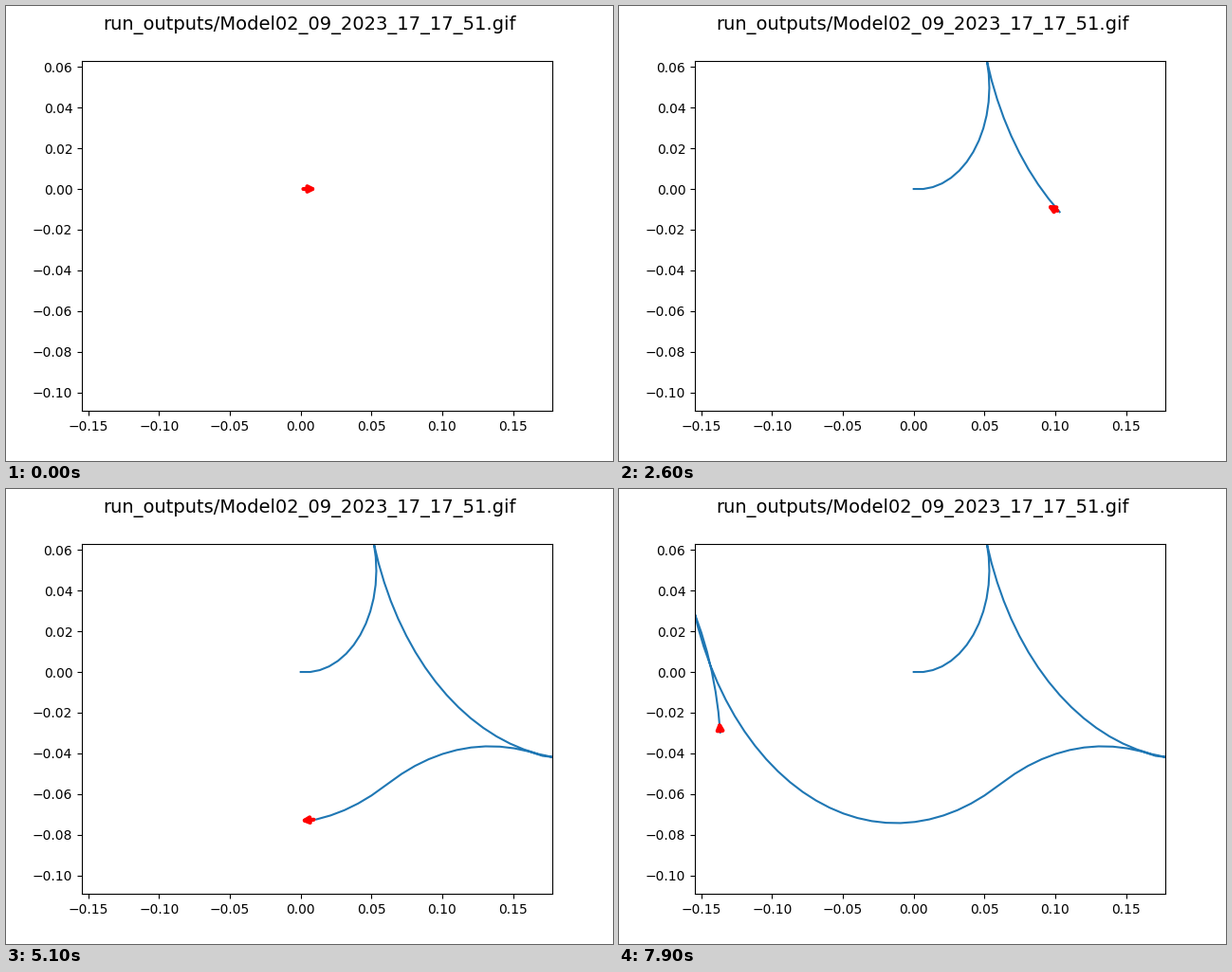
Animation of 640 by 480 pixels, one loop 8000 ms. Source, as a matplotlib script:

```python
import numpy as np
import matplotlib.pyplot as plt
from matplotlib.animation import FuncAnimation

WHEEL = 0.0136  # distance a wheel rolls per frame at full speed
BASE = 0.1      # distance between the two wheels
ARROW = 0.04    # arrow length as a share of each axis range

# Wheel settings: (left, right) as shares of full speed
PARK = (0, 0)
STRAIGHT = (1, 1)
PIVOT_LEFT, PIVOT_RIGHT = (0, 1), (1, 0)
BEND_LEFT, BEND_RIGHT = (0.5, 1), (1, 0.5)

poses = [(0.0, 0.0, 0.0)]


def roll(wheels, steps=1, gear=1):
    """Drive the two-wheeled cart and record its pose after each step."""
    left, right = (gear * WHEEL * w for w in wheels)
    dist, turn = (left + right) / 2, (right - left) / BASE
    for _ in range(steps):
        x, y, a = poses[-1]
        poses.append((x + dist * np.cos(a), y + dist * np.sin(a), a + turn))


roll(PARK)
roll(PIVOT_LEFT, 14)
roll(PARK, 2)
roll(BEND_RIGHT, 17, gear=-1)
roll(PIVOT_RIGHT)
roll(BEND_LEFT, 10)
roll(STRAIGHT)
roll(BEND_RIGHT, 25)
roll(PARK)
roll(PIVOT_LEFT)
roll(BEND_LEFT, 6, gear=-1)

xs, ys, headings = np.array(poses).T
xlim = xs.min(), xs.max()
ylim = -0.109, ys.max()

fig, ax = plt.subplots(figsize=(6.4, 4.8), dpi=100)
fig.suptitle("run_outputs/Model02_09_2023_17_17_51.gif", fontsize=14)
ax.set_xlim(*xlim)
ax.set_ylim(*ylim)

trail, = ax.plot([], [], color="C0", lw=1.5)
arrow = ax.annotate(
    "", xy=(0, 0), xytext=(0, 0), annotation_clip=False,
    arrowprops=dict(arrowstyle="-|>", color="red", lw=3),
)


def update(i):
    x, y, a = poses[i]
    trail.set_data(xs[:i + 1], ys[:i + 1])
    arrow.set_position((x, y))
    arrow.xy = (x + ARROW * np.ptp(xlim) * np.cos(a),
                y + ARROW * np.ptp(ylim) * np.sin(a))
    return trail, arrow


anim = FuncAnimation(fig, update, frames=len(poses), interval=100,
                     init_func=lambda: update(0), repeat=True)
plt.show()
```
